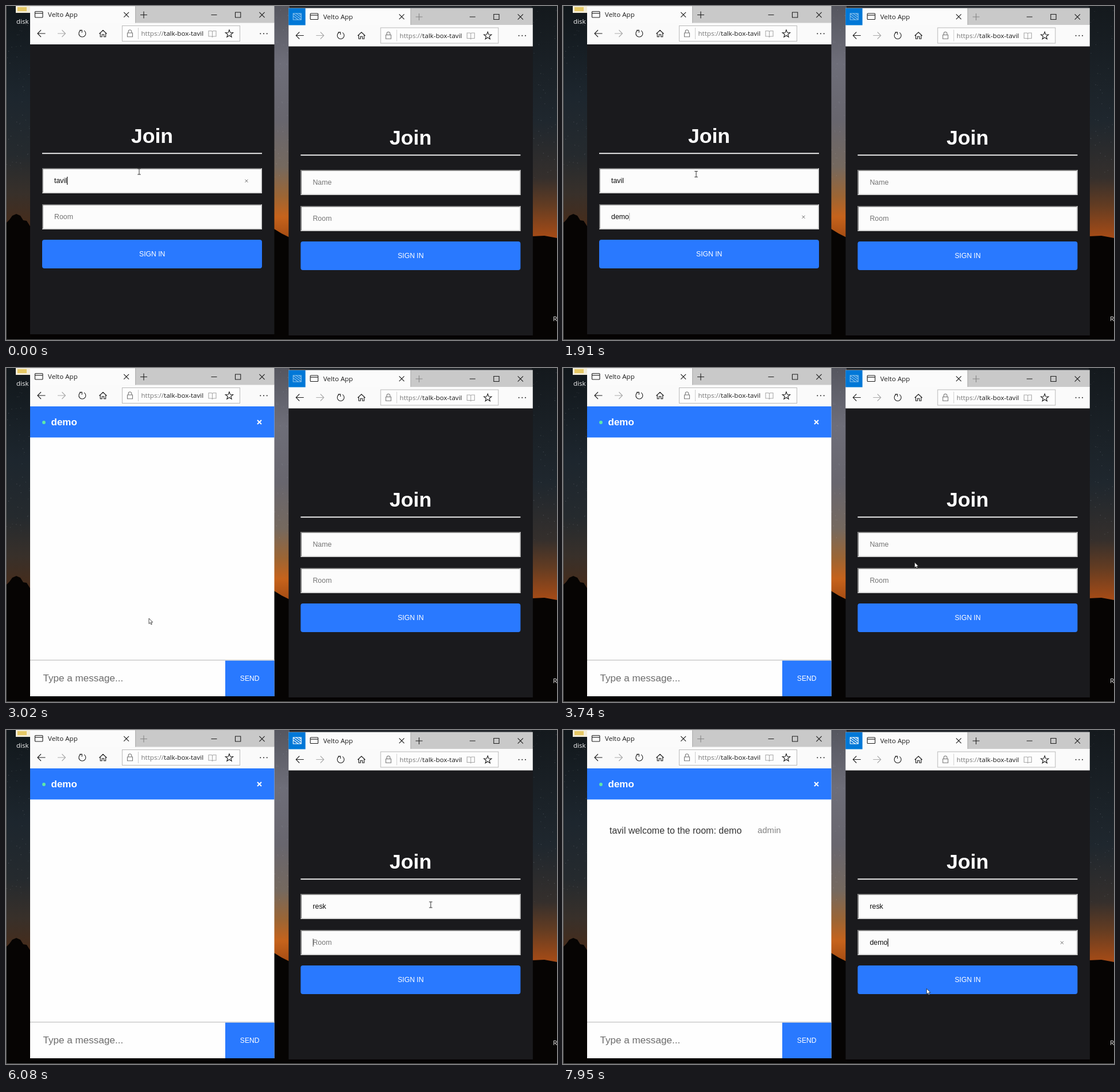
An HTML page for the animation above (8000 ms loop, 960 px wide and 583 px high).

```html
<!DOCTYPE html>
<html lang="en">
<head>
<meta charset="utf-8">
<title>Chat demo</title>
<style>
  html, body { margin: 0; width: 100%; height: 100%; overflow: hidden; background: #050303; }
  svg { display: block; width: 100vw; height: 100vh; }
  text { white-space: pre; font-family: "Liberation Sans", Arial, sans-serif; }
  .ui text { font: 11.6px "Open Sans", "Noto Sans", sans-serif; }
  .ico { fill: none; stroke: #1c1c1c; stroke-width: 1.1; }
  .pale { stroke: #a9a9a9; }
  .in { font-size: 12.4px; }
  .btn { font-size: 12.2px; fill: #fff; text-anchor: middle; }
</style>
</head>
<body>
<svg id="stage" viewBox="0 0 960 583" preserveAspectRatio="none"></svg>
<script>
const LOOP = 8000;
const BLUE = '#2979ff';
const USER = ['tavil', 'resk'];
const ROOM = 'demo';
const ROWS = [{ y: 283, hint: 'Name' }, { y: 346, hint: 'Room' }];

// Value tracks: [start time, value]
const focusAt = [
  [[0, 0], [280, 1], [2870, -1]],
  [[0, -1], [3983, 0], [5670, 1]]
];
const caretAt = [
  [[0, 1], [620, .45], [757, 0], [893, 1], [1910, .3], [2047, 0], [2457, 1], [2870, 0]],
  [[0, 0], [3983, 1], [4390, .45], [4520, 0], [4970, 1], [6080, .6], [6230, 1],
   [7150, .45], [7283, 0], [7817, 1]]
];
const typedAt = [
  [[[0, 5]], [[0, 0], [893, 1], [1030, 2], [1303, 3], [1440, 4]]],
  [[[0, 0], [4970, 1], [5110, 2], [5250, 3], [5390, 4]],
   [[0, 0], [6230, 1], [6500, 2], [6640, 3], [6770, 4]]]
];
// Pointer moves: start, end, number of steps, target
const moves = [
  [1909, 1910, 1, [232, 293.5]],
  [1910, 2733, 6, [249, 437]],
  [3163, 3983, 6, [740, 305]],
  [7283, 7950, 5, [633.5, 451.5]]
];
const CHAT_AT = 3020, SWITCH_AT = 3983, HELLO_AT = 7550;

const at = (track, t) => track.reduce((v, [start, val]) => t >= start ? val : v, track[0][1]);
const rect = (x, y, w, h, fill, more = '') =>
  `<rect x="${x}" y="${y}" width="${w}" height="${h}" fill="${fill}" ${more}/>`;
const text = (x, y, str, more = '') => `<text x="${x}" y="${y}" ${more}>${str}</text>`;
const icon = (d, more = '') => `<path class="ico ${more}" d="${d}"/>`;
const cross = (x, y, r, more = '') =>
  `<path d="M${x - r} ${y - r}l${2 * r} ${2 * r}m0 ${-2 * r}l${-2 * r} ${2 * r}" ${more || 'class="ico"'}/>`;

function gradient(id, stops) {
  return `<linearGradient id="${id}" gradientUnits="userSpaceOnUse" x1="0" y1="0" x2="0" y2="400">` +
    stops.map(([o, c]) => `<stop offset="${o}" stop-color="${c}"/>`).join('') + '</linearGradient>';
}

function stars() {
  let seed = 7, out = '';
  const rnd = () => (seed = seed * 16807 % 2147483647) / 2147483647;
  for (let i = 0; i < 150; i++) {
    const [x0, w] = [[1, 41], [468, 25], [917, 43]][i % 3];
    out += rect((x0 + rnd() * w).toFixed(1), (rnd() * 300).toFixed(1), 1, 1,
      '#c3c8d2', `opacity="${(.08 + rnd() * .25).toFixed(2)}"`);
  }
  return out;
}

function desktop() {
  return '<defs>' +
    gradient('skyL', [[0, '#11171b'], [.4, '#1d262e'], [.65, '#252a2e'], [.82, '#38302a'], [1, '#4c2b16']]) +
    gradient('skyM', [[0, '#55565f'], [.25, '#6e6e79'], [.5, '#68666e'], [.7, '#75695f'], [.83, '#9c6534'], [.92, '#c6631c'], [1, '#a94f14']]) +
    gradient('skyR', [[0, '#14191d'], [.5, '#1f272e'], [.75, '#352f2c'], [.87, '#633c22'], [1, '#a14a17']]) +
    '<clipPath id="urlBox"><rect x="232" y="36" width="112" height="25"/></clipPath></defs>' +
    rect(0, 0, 960, 583, '#050303') +
    rect(0, 0, 43, 420, 'url(#skyL)') + rect(467, 0, 27, 420, 'url(#skyM)') +
    rect(494, 0, 424, 5, '#23272c') + rect(916, 0, 44, 420, 'url(#skyR)') + stars() +
    '<path fill="#060403" d="M0 379L6 373L11 366L18 363L25 366L30 374L36 375L43 386V583H0zM467 389L480 397L494 404V583H467zM916 402L938 401L960 405V583H916z"/>' +
    rect(17, 0, 26, 12, '#f3ecd8') + rect(20, 2, 16, 7, '#e6c865') +
    `<g class="ui" fill="#f2f2f2">${text(18, 31, 'disk 2')}${text(953, 550, 'R')}</g>` +
    '<path d="M.5 0V582.5H960" fill="none" stroke="#5a5a5a" stroke-width="1"/>';
}

function starPath(cx, cy, r) {
  return 'M' + Array.from({ length: 10 }, (_, i) => {
    const a = -Math.PI / 2 + i * Math.PI / 5, k = i % 2 ? r * .42 : r;
    return `${(cx + k * Math.cos(a)).toFixed(1)} ${(cy + k * Math.sin(a)).toFixed(1)}`;
  }).join('L') + 'z';
}

// Title bar and toolbar of one browser window
function chrome(n) {
  const shift = n ? 29.4 : 0;
  const badge = n
    ? rect(42, .5, 30, 29.5, '#0078d7') +
      '<g id="badge" fill="none" stroke="#fff" stroke-width="1.1"><rect x="50" y="9.5" width="14" height="11"/>' +
      '<path d="M50 14L59 20.5M50 10L64 20M55 9.5L64 16M60 9.5L64 12.5"/></g>'
    : '';
  return `<g class="ui" transform="translate(${n ? '450.3 3.5' : '0 0'})">` +
    rect(42, 0, 425.5, 30, '#c9c9c9') + rect(42, 29.5, 425.5, 37.5, '#fafafa') + badge +
    `<g transform="translate(${shift} 0)">` + rect(42, .5, 183, 30, '#fbfbfb') +
    rect(225, .5, 1.2, 29, '#b2b2b2') +
    '<rect class="ico" x="50.5" y="9.5" width="13.5" height="10.5" rx="1"/>' + icon('M50.5 12.6H64') +
    text(73, 19.4, 'Velto App', 'fill="#1b1b1b"') + cross(209.7, 15.3, 4.4) +
    `<path id="plus${n}" class="ico" d="M234 15.5H246M240 9.5V21.5"/></g>` +
    icon('M357.5 15.5H367.5M399.5 11H408.8V20H399.5z') + cross(446, 15.5, 4.6) +
    icon('M68.5 48H55M61 42L55 48L61 54') + icon('M90 48H103.5M97.5 42L103.5 48L97.5 54', 'pale') +
    icon('M130 42.8A6 6 0 1 0 136 42.9M128.3 42.4H132.4V46.5') +
    icon('M162.5 48.5L169 42.3L175.5 48.5M164.3 47V53.8H167.3V49.8H170.7V53.8H173.7V47') +
    '<rect x="202.5" y="34.5" width="205" height="27" fill="#fdfdfd" stroke="#b9b9b9"/>' +
    '<path class="ico" style="stroke:#777" d="M211.5 47H220.5V53.8H211.5zM213.2 47V44.5A2.8 2.8 0 0 1 218.8 44.5V47"/>' +
    rect(230, 38, 1, 20, '#cfcfcf') +
    `<g clip-path="url(#urlBox)">${text(235.5, 52.3, '<tspan fill="#777">https://</tspan>talk-box-tavilo', 'fill="#1b1b1b"')}</g>` +
    icon('M353 43.5H358L359.5 44.5L361 43.5H366V53H361L359.5 54L358 53H353zM359.5 44.5V54', 'pale') +
    icon(starPath(389, 48.6, 7)) +
    [443.3, 449, 454.7].map(x => `<circle cx="${x}" cy="48.2" r="1" fill="#222"/>`).join('') +
    '</g>';
}

function login(n) {
  const field = (row, i) => {
    const { y } = row;
    return rect(63, y, 383, 44, '#fcfcfc') +
      `<path fill="#767676" d="M63 ${y}H446L444.3 ${y + 1.7}H64.7V${y + 42.3}L63 ${y + 44}z"/>` +
      `<path fill="#d2d2d2" d="M446 ${y}V${y + 44}H63L64.7 ${y + 42.3}H444.3V${y + 1.7}z"/>` +
      text(84, y + 26, '', `class="in" id="val${n}${i}"`) +
      rect(84, y + 15, 1.1, 14, '#000', `id="car${n}${i}"`) +
      cross(419, y + 22.3, 2.5, `id="clr${n}${i}" fill="none" stroke="#6a6a6a" stroke-width="1"`);
  };
  return `<g id="login${n}" transform="translate(${n ? '450.4 3' : '0 0'})">` +
    rect(42, 67, 425.5, n ? 505 : 506, '#1a1a1d') +
    text(254.5, 239.3, 'Join', 'fill="#fff" font-size="35.6" font-weight="700" text-anchor="middle"') +
    rect(63, 256.4, 383, 1.8, '#fff') + ROWS.map(field).join('') +
    rect(63, 408, 383, 50, BLUE, 'rx="4"') + text(254.7, 437.4, 'SIGN IN', 'class="btn"') + '</g>';
}

function chat() {
  return '<g id="chat">' + rect(42, 67, 425.5, 506, '#fefefe') + rect(42, 67, 425.5, 54.3, BLUE) +
    '<circle cx="66" cy="95" r="2.9" fill="#5fe8a6"/>' +
    text(78.5, 100.2, ROOM, 'fill="#fff" font-size="17" font-weight="700"') +
    cross(441.5, 94.5, 3.5, 'fill="none" stroke="#fff" stroke-width="2"') +
    `<g id="hello">${text(81, 180.5, `${USER[0]} welcome to the room: ${ROOM}`, 'font-size="16" fill="#353535"')}` +
    text(339, 180, 'admin', 'font-size="14.9" fill="#828282"') + '</g>' +
    rect(42, 509, 425.5, 1.8, '#d3d3d3') +
    text(64.5, 547.2, 'Type a message...', 'font-size="17.1" fill="#6c6c6c"') +
    rect(382, 510.8, 85.5, 62.2, BLUE) + text(424.7, 545.6, 'SEND', 'class="btn"') + '</g>';
}

const pointer = '<g id="arrow"><path d="M0 0V9.4L2.2 7.4L3.8 10.8L5.3 10.1L3.8 6.8H6.7z" fill="#fff" stroke="#222" stroke-width=".8"/></g>' +
  '<path id="beam" d="M-2.8 -5H2.8M0 -5V5M-2.8 5H2.8" fill="none" stroke="#333" stroke-width="1"/>';

document.getElementById('stage').innerHTML =
  desktop() + login(0) + chat() + chrome(0) + login(1) + chrome(1) + pointer;

const $ = id => document.getElementById(id);
const show = (el, on) => el.setAttribute('visibility', on ? 'visible' : 'hidden');

function drawForm(n, t) {
  const focus = at(focusAt[n], t);
  ROWS.forEach(({ hint }, i) => {
    const val = $(`val${n}${i}`), caret = $(`car${n}${i}`);
    const word = (i ? ROOM : USER[n]).slice(0, at(typedAt[n][i], t));
    val.textContent = word || hint;
    val.setAttribute('fill', word ? '#0c0c0c' : '#757575');
    caret.setAttribute('x', 84.2 + (word ? val.getComputedTextLength() : 0));
    caret.setAttribute('opacity', focus === i ? at(caretAt[n], t) : 0);
    $(`clr${n}${i}`).setAttribute('opacity', focus === i && word ? 1 : 0);
  });
}

function pointerAt(t) {
  let p = [232, 289];
  for (const [start, end, steps, to] of moves) {
    if (t < start) break;
    const k = Math.min(1, Math.floor((t - start) / (end - start) * steps + 1e-6) / steps);
    const e = k * k * (3 - 2 * k);
    p = p.map((v, i) => v + (to[i] - v) * e);
  }
  return p;
}

function overField([x, y], t) {
  const n = x > 480 ? 1 : 0;
  if (!n && t >= CHAT_AT) return false;
  const lx = x - n * 450.4, ly = y - n * 3;
  return lx > 63 && lx < 446 && ROWS.some(r => ly > r.y && ly < r.y + 44);
}

function draw(t) {
  drawForm(0, t);
  drawForm(1, t);
  show($('login0'), t < CHAT_AT);
  show($('chat'), t >= CHAT_AT);
  show($('hello'), t >= HELLO_AT);

  const right = t >= SWITCH_AT;
  $('plus0').style.stroke = right ? '#858585' : '#1c1c1c';
  $('plus1').style.stroke = right ? '#1c1c1c' : '#858585';
  $('badge').setAttribute('opacity', right ? 1 : .55);

  const p = pointerAt(t), beam = overField(p, t);
  for (const id of ['arrow', 'beam']) {
    $(id).setAttribute('transform', `translate(${p[0].toFixed(2)} ${p[1].toFixed(2)})`);
    show($(id), (id === 'beam') === beam);
  }
}

const began = performance.now();
function tick() {
  draw((performance.now() - began) % LOOP);
  requestAnimationFrame(tick);
}
tick();
</script>
</body>
</html>
```
